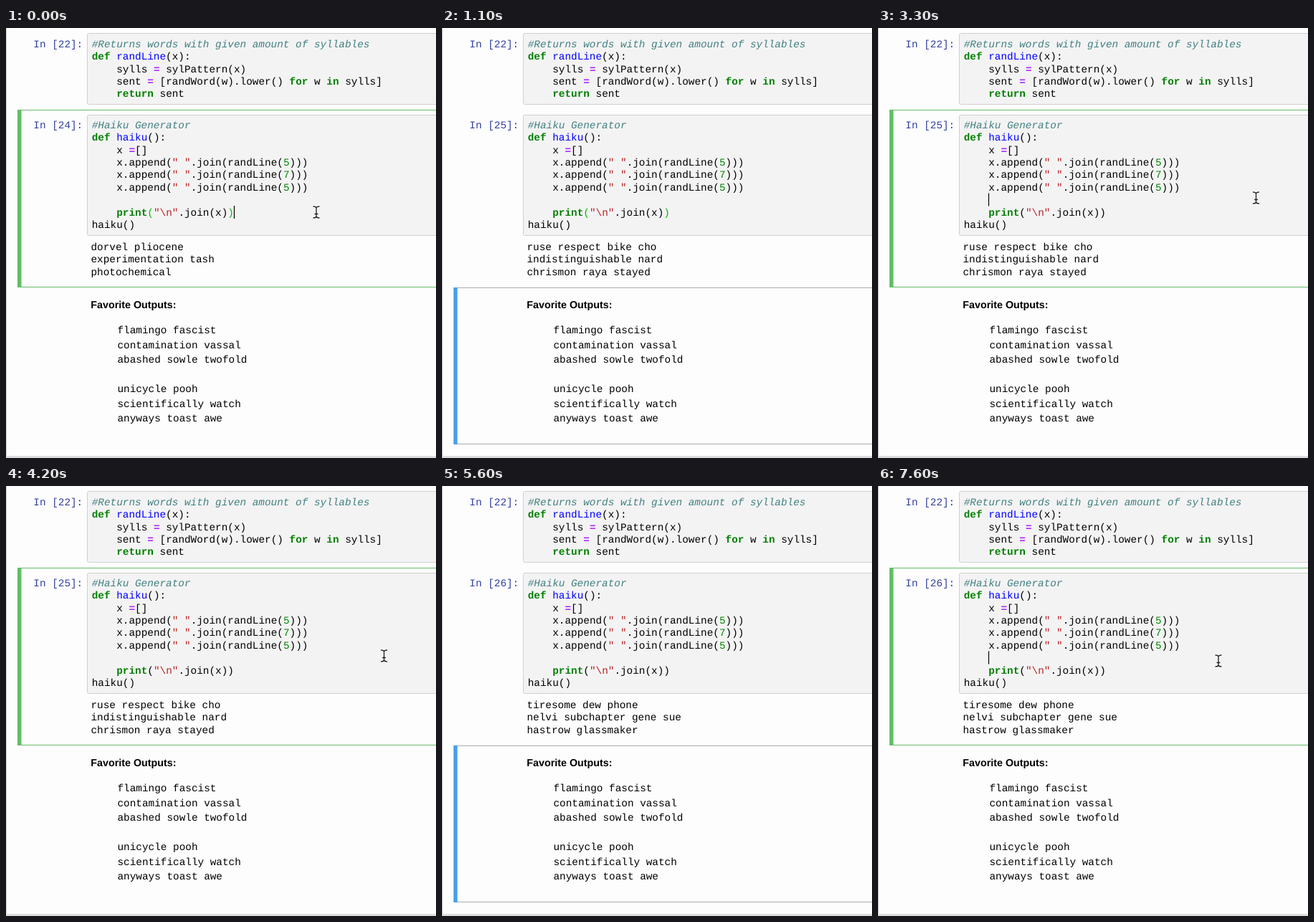
An HTML page that plays this animation: 600 px wide and 600 px high, repeating every 8 s.

```html
<!DOCTYPE html>
<html lang="en">
<head>
<meta charset="utf-8">
<title>Haiku notebook</title>
<style>
  html, body { margin: 0; width: 100%; height: 100%; overflow: hidden; background: #fefdfe; }
  svg { display: block; width: 100%; height: 100%; }
  text { white-space: pre; text-rendering: geometricPrecision; }
  .mono { font: 14.36px "Liberation Mono", "Courier New", monospace; }
  .title { font: bold 14.3px "Liberation Sans", Arial, sans-serif; }
  .prompt { fill: #303f9f; }
  .box { fill: #f4f3f4; stroke: #cfcfcf; }
  .comment { fill: #408080; font-style: italic; }
  .keyword { fill: #008000; font-weight: bold; }
  .name { fill: #0000ff; }
  .operator { fill: #aa22ff; font-weight: bold; }
  .number { fill: #008800; }
  .string { fill: #ba2121; }
</style>
</head>
<body>
<svg id="stage" viewBox="0 0 600 600"></svg>
<script>
const LOOP = 8000;
const CODE_X = 119.7;
const LINE = 17.4;

const randLine = [
  '#Returns words with given amount of syllables',
  'def randLine(x):',
  '    sylls = sylPattern(x)',
  '    sent = [randWord(w).lower() for w in sylls]',
  '    return sent'
];
const haiku = [
  '#Haiku Generator',
  'def haiku():',
  '    x =[]',
  ...[5, 7, 5].map(n => `    x.append(" ".join(randLine(${n})))`),
  '',
  '    print("\\n".join(x))',
  'haiku()'
];
const favorites = [
  'flamingo fascist', 'contamination vassal', 'abashed sowle twofold', '',
  'unicycle pooh', 'scientifically watch', 'anyways toast awe'
];
const outputs = [
  ['dorvel pliocene', 'experimentation tash', 'photochemical'],
  ['ruse respect bike cho', 'indistinguishable nard', 'chrismon raya stayed'],
  ['tiresome dew phone', 'nelvi subchapter gene sue', 'hastrow glassmaker']
];

// Each entry holds from its start time until the next one.
const states = [
  { at: 0, run: 0, edit: true, match: true, caret: [318.5, 257] },
  { at: 600, run: 0, edit: true, match: true },
  { at: 900, run: 1, match: true },
  { at: 3200, run: 1, edit: true, caret: [154.5, 239.5] },
  { at: 3800, run: 1, edit: true },
  { at: 4300, run: 1, edit: true, caret: [154.5, 239.5] },
  { at: 4800, run: 1, edit: true },
  { at: 5100, run: 2 },
  { at: 7500, run: 2, edit: true, caret: [154.5, 239.5] }
];

// Pointer moves as [time, x, y]; it is hidden between the groups.
const moves = [
  [[0, 433, 257], [100, 434, 257], [400, 449, 256], [900, 449, 256]],
  [[2300, 455, 256], [2800, 527.5, 238], [3200, 527.5, 237], [5100, 527.5, 237]],
  [[6000, 522, 241], [6300, 504, 246], [6700, 480, 236], [6800, 480, 236],
   [7000, 475, 246], [7200, 475, 246], [7300, 475, 244], [8000, 475, 244]]
];

const tokens = [
  ['comment', /^#.*/],
  ['string', /^"[^"]*"/],
  ['keyword', /^(def|return|for|in|print)\b/],
  ['operator', /^=/],
  ['number', /^\d/],
  ['plain', /^(\w+|.)/]
];

function highlight(line) {
  let html = '', previous = '';
  while (line) {
    let [kind, rule] = tokens.find(([, r]) => r.test(line));
    const word = line.match(rule)[0];
    if (previous === 'def' && /\w/.test(word)) kind = 'name';
    html += `<tspan class="${kind}">${word}</tspan>`;
    if (word !== ' ') previous = word;
    line = line.slice(word.length);
  }
  return html;
}

const textLines = (lines, x, y, step, format = s => s) => lines.map((line, i) =>
  `<text class="mono" x="${x}" y="${y + i * step}">${format(line)}</text>`).join('');

const prompt = (id, y, n) =>
  `<text id="${id}" class="mono prompt" x="38.3" y="${y}">In [${n}]:</text>`;

const frame = (id, y, height, bar, line) => `<g id="${id}">
  <rect x="16.5" y="${y + .5}" width="600" height="${height}" fill="none" stroke="${line}"/>
  <rect x="16.5" y="${y}" width="5" height="${height + 1}" fill="${bar}"/></g>`;

const beam = 'M-4 -8Q-.5 -8 0 -6Q.5 -8 4 -8M0 -6V6M-4 8Q-.5 8 0 6Q.5 8 4 8M-2 2.5H2';

const $ = id => document.getElementById(id);

$('stage').innerHTML = `
  <rect width="600" height="600" fill="#fefdfe"/>
  <rect width="1" height="598" fill="#cfcfcf"/>
  <rect y="597" width="600" height="3" fill="#dedede"/>
  ${frame('editFrame', 114, 247, '#62bd65', '#66bb6a')}
  ${frame('blueFrame', 362, 218, '#42a0ee', '#ababab')}
  <rect class="box" x="113.5" y="7.5" width="500" height="99" rx="2"/>
  <rect class="box" x="113.5" y="121.5" width="500" height="168" rx="2"/>
  ${prompt('firstPrompt', 26.8, 22)}
  ${prompt('runPrompt', 139.8, 24)}
  ${textLines(randLine, CODE_X, 26.8, LINE, highlight)}
  ${textLines(haiku, CODE_X, 139.8, LINE, highlight)}
  <g id="output"></g>
  <text class="title" x="118.3" y="391">Favorite Outputs:</text>
  ${textLines(favorites, 155.5, 426, 20.53)}
  <rect id="caret" width="1.2" height="18" fill="#000"/>
  <g id="pointer" fill="none" stroke-linecap="round">
    <path d="${beam}" stroke="#fff" stroke-width="3"/>
    <path d="${beam}" stroke="#222" stroke-width="1.4"/>
  </g>`;

const printLine = [...document.querySelectorAll('text')]
  .find(t => t.textContent.includes('print('));
const brackets = [...printLine.children].filter(s => /^[()]$/.test(s.textContent));
const matched = [brackets[0], brackets[brackets.length - 1]];

const show = (node, on) => node.setAttribute('visibility', on ? 'visible' : 'hidden');

function pointerAt(t) {
  const path = moves.find(p => t >= p[0][0] && t < p[p.length - 1][0]);
  if (!path) return null;
  const i = path.findIndex(p => p[0] > t);
  const [t0, x0, y0] = path[i - 1], [t1, x1, y1] = path[i];
  const k = (t - t0) / (t1 - t0);
  return [x0 + (x1 - x0) * k, y0 + (y1 - y0) * k];
}

let shownRun = -1;

function draw(time) {
  const t = Math.floor(time % LOOP / 100) * 100;
  const state = states.filter(s => s.at <= t).pop();

  if (state.run !== shownRun) {
    shownRun = state.run;
    $('runPrompt').textContent = `In [${24 + shownRun}]:`;
    $('output').innerHTML = textLines(outputs[shownRun], 118.5, 310, LINE);
  }
  show($('editFrame'), state.edit);
  show($('blueFrame'), !state.edit);
  matched.forEach(s => s.style.fill = state.match ? '#00bb00' : '');

  show($('caret'), state.caret);
  if (state.caret) {
    $('caret').setAttribute('x', state.caret[0] - .6);
    $('caret').setAttribute('y', state.caret[1] - 9);
  }
  const spot = pointerAt(t);
  show($('pointer'), spot);
  if (spot) $('pointer').setAttribute('transform', `translate(${spot})`);
}

const start = performance.now();
function tick() {
  draw(performance.now() - start);
  requestAnimationFrame(tick);
}
tick();
</script>
</body>
</html>
```
